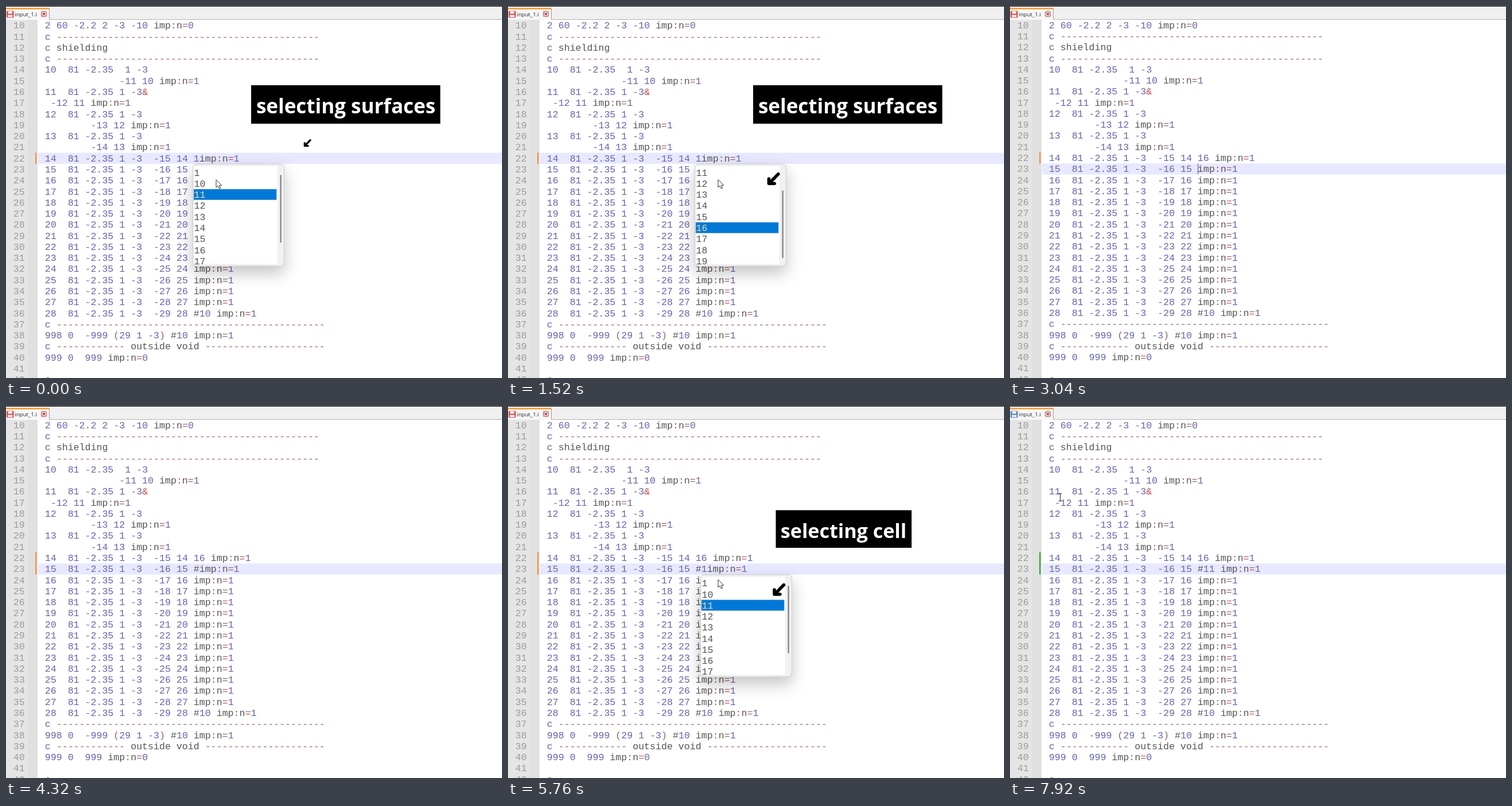
These frames come from a looping animation (864 px wide and 648 px high, 8 s). An HTML page:

```html
<!DOCTYPE html>
<html lang="en">
<head>
<meta charset="utf-8">
<title>Editor autocompletion</title>
<style>
  html, body { margin: 0; width: 100%; height: 100%; overflow: hidden; background: #fff; }
  svg { display: block; width: 100vw; height: 100vh; }
  text { white-space: pre; }
  .mono { font: 16.6px "Liberation Mono", monospace; fill: #545454; }
  .gutter { fill: #9c9c9c; }
  .num { fill: #6664ae; }
  .neg { fill: #8a6a94; }
  .op { fill: #a85a60; }
  .dash { fill: #a4686a; }
  .amp { fill: #c04848; }
  .green { fill: #2e8b60; }
  .tab { font: 9.6px "Open Sans", sans-serif; fill: #222; }
  .label text { font-family: "Open Sans", sans-serif; font-weight: 700; fill: #fff; text-anchor: middle; }
</style>
</head>
<body>
<svg viewBox="0 0 864 648">
  <defs>
    <filter id="shadow" x="-40%" y="-40%" width="180%" height="190%">
      <feDropShadow dx="0" dy="12" stdDeviation="14" flood-color="#000" flood-opacity=".23"/>
    </filter>
    <clipPath id="listClip"><rect x="-1" y="3" width="146" height="172"/></clipPath>
  </defs>
  <rect width="864" height="648" fill="#fff"/>
  <rect y="24" width="38" height="624" fill="#e5e5e5"/>
  <rect x="38" y="24" width="17" height="624" fill="#e0e0e0"/>
  <g id="doc">
    <rect id="current" x="56" width="808" height="19.3" fill="#e8e8ff"/>
    <rect id="changed" x="51" width="2.4"/>
    <g id="lines" class="mono"></g>
    <rect id="caret" width="1.4" height="18" fill="#7a5ae0"/>
    <g id="popup">
      <rect x="-2" width="159" height="178" rx="7" fill="#f1f1f1" stroke="#bbb" stroke-width=".8" filter="url(#shadow)"/>
      <rect x="-1" y="4" width="146" height="170" fill="#fff"/>
      <rect id="selected" x="-.5" width="144" height="18.5" fill="#0078d7" stroke="#5f8fae" stroke-dasharray="1"/>
      <g id="items" class="mono" clip-path="url(#listClip)"></g>
      <rect id="thumb" x="149.8" width="2.4" height="118" rx="1.2" fill="#868686"/>
    </g>
  </g>
  <rect width="864" height="24" fill="#f0f0f0"/>
  <rect width="864" height="1" fill="#111"/>
  <rect y="23" width="864" height="1" fill="#b4b4b4"/>
  <rect y="4" width="75" height="20" fill="#f7f7f7"/>
  <rect y="3" width="75" height="3" fill="#f5a64a"/>
  <path d="M75.5 4V23" stroke="#999"/>
  <g id="disk">
    <rect x="1" y="8.5" width="12.5" height="12" rx="1.5"/>
    <rect x="3.5" y="9" width="7.5" height="4.5" fill="#f4f0f0"/>
    <rect x="3" y="15.5" width="8.5" height="4" fill="#eee"/>
  </g>
  <text class="tab" x="15.5" y="18">input_1.i</text>
  <rect x="61.5" y="9.5" width="9" height="9" rx="1" fill="#f6e6e6" stroke="#a05a62"/>
  <path d="M63.5 11.5l5 5m0-5l-5 5" stroke="#b02c38" stroke-width="1.4"/>
  <path id="arrow" d="M.38-.38L-.32.34M-.37 0V.37H.08" fill="none" stroke="#000" stroke-width=".25" stroke-linecap="round" stroke-linejoin="round"/>
  <g id="label1" class="label">
    <rect x="427" y="138" width="329.5" height="67"/>
    <text x="592" y="187" font-size="35">selecting surfaces</text>
  </g>
  <g id="label2" class="label">
    <rect x="466.5" y="181.5" width="236.5" height="65.5"/>
    <text x="584.5" y="229.5" font-size="34.1">selecting cell</text>
  </g>
  <path id="pointer" d="M366 302.500v13.500l3.200-2.800 2.200 5 2.300-1-2.200-4.800h4.100z" fill="#fff" stroke="#333" stroke-width="1"/>
  <path id="beam" d="M-3-6.500H-1Q0-6.500 0-5.500Q0-6.500 1-6.500H3M0-5.500V5.500M-3 6.500H-1Q0 6.500 0 5.500Q0 6.500 1 6.500H3" fill="none" stroke="#333" stroke-width="1.100"/>
</svg>
<script>
const LOOP = 8000, PITCH = 19.28, COL = 9.962, LEFT = 67.8, FIRST = 10;
const $ = id => document.getElementById(id);
const midY = n => 33.7 + (n - FIRST) * PITCH;
const lerp = (a, b, p) => a + (b - a) * p;
const clamp = p => Math.max(0, Math.min(1, p));
const easeOut = p => 1 - (1 - p) ** 2;
const easeInOut = p => p * p * (3 - 2 * p);
const between = (t, a, b) => t >= a && t < b;
const show = (id, on) => $(id).setAttribute('display', on ? 'inline' : 'none');
const set = (id, attrs) => { for (const k in attrs) $(id).setAttribute(k, attrs[k]); };

// Last entry [time, value...] already reached at t
const at = (steps, t) => steps.filter(s => s[0] <= t).pop();

const rule = n => '-'.repeat(n);
const cell = (n, extra = '') => `${n}  81 -2.35 1 -3  -${n + 1} ${n} ${extra}imp:n=1`;
const source = [
  '2 60 -2.2 2 -3 -10 imp:n=0',
  'c ' + rule(46), 'c shielding', 'c ' + rule(46),
  '10  81 -2.35  1 -3', ' '.repeat(13) + '-11 10 imp:n=1',
  '11  81 -2.35 1 -3&', ' -12 11 imp:n=1',
  '12  81 -2.35 1 -3', ' '.repeat(8) + '-13 12 imp:n=1',
  '13  81 -2.35 1 -3', ' '.repeat(8) + '-14 13 imp:n=1'
];
for (let n = 14; n < 28; n++) source.push(cell(n));
source.push(cell(28, '#10 '), 'c ' + rule(47), '998 0  -999 (29 1 -3) #10 imp:n=1',
  `c ${rule(12)} outside void ${rule(21)}`, '999 0  999 imp:n=0', '', 'c ' + rule(46));

const span = (cls, s) => `<tspan class="${cls}">${s}</tspan>`;
function paint(s) {
  if (s[0] === 'c') return span('num', 'c') + s.slice(1).replace(/-+/g, m => span('dash', m));
  return s.replace(/-(?=\d)|[\d.]+|[:=()]|&/g, m =>
    m === '&' ? span('amp', '&amp;') : m === '-' ? span('neg', m) :
    /\d/.test(m) ? span('num', m) : span('op', m));
}

$('lines').innerHTML = source.map((s, i) => {
  const n = FIRST + i, y = midY(n) + 5.6;
  return `<text class="gutter" x="12.8" y="${y}">${n}</text>` +
    `<text id="line${n}" x="${LEFT}" y="${y}">${n === 42 ? span('green', s) : paint(s)}</text>`;
}).join('');

const ROWS = 9;
$('items').innerHTML = Array.from({ length: ROWS }, (_, i) =>
  `<text id="item${i}" x="0" y="${20.4 + i * PITCH}"></text>`).join('');

const written = {};
function write(id, html) {
  if (written[id] !== html) $(id).innerHTML = written[id] = html;
}

const typed22 = [[0, '1'], [1840, '16'], [1920, '16 ']];
const typed23 = [[0, ''], [3300, '#'], [4700, '#1'], [5880, '#11'], [5940, '#11 ']];
const carets = [[0, 22, 27], [1840, 22, 28], [1920, 22, 29], [2080, 23, 29], [2720, 23, 28],
  [2800, 23, 27], [2880, 23, 26], [3300, 23, 27], [4700, 23, 28], [5880, 23, 29], [5940, 23, 30]];
const popups = [
  { from: 0, to: 1840, line: 22, col: 26, picks: [[0, 2], [240, 3], [480, 4], [720, 5], [960, 6], [1200, 7]] },
  { from: 4700, to: 5880, line: 23, col: 27, picks: [[0, 0], [4960, 1], [5440, 2]] }
];

// Each label sends an arrow [x, y, size] from behind it to the list
const labels = [
  { id: 'label1', from: -500, to: 1880, a: [588, 176, 4], b: [462.5, 301, 22] },
  { id: 'label2', from: 4780, to: 6240, a: [591, 223, 12], b: [472, 320, 22] }
];
const FLIGHT = 1000;

function drawPopup(t) {
  const p = popups.find(q => between(t, q.from, q.to));
  show('popup', p);
  show('pointer', p);
  if (!p) return;
  const pick = at(p.picks, t)[1], top = Math.max(0, pick - 5);
  set('popup', { transform: `translate(${LEFT + p.col * COL + .8} ${midY(p.line) + 10.1})` });
  set('selected', { y: 5.4 + (pick - top) * PITCH });
  set('thumb', { y: 19 + top * 13.5 });
  for (let i = 0; i < ROWS; i++) {
    const k = top + i;
    write('item' + i, k ? 9 + k : 1);
    $('item' + i).style.fill = k === pick ? '#e0dca8' : '';
  }
}

function drawLabels(t) {
  const current = labels.find(l => between(t, l.from, l.to));
  for (const l of labels) show(l.id, l === current);
  show('arrow', current);
  if (!current) return;
  const p = easeInOut(clamp((t - current.from) / FLIGHT));
  const [x, y, s] = current.a.map((v, i) => lerp(v, current.b[i], p));
  set('arrow', { transform: `translate(${x} ${y}) scale(${s})` });
}

function render(t) {
  set('doc', { transform: `translate(0 ${t < 2960 ? 0 : -.6})` });
  write('line22', paint(cell(14, at(typed22, t)[1])));
  write('line23', paint(cell(15, at(typed23, t)[1])));

  const [since, line, col] = at(carets, t);
  set('current', { y: midY(line) - 9.5 });
  set('caret', { x: LEFT + col * COL, y: midY(line) - 9 });
  const popupOpen = popups.some(q => between(t, q.from, q.to));
  show('caret', !popupOpen && Math.floor((t - since) / 530) % 2 === 0);

  const saved = t >= 7200;
  set('changed', { y: midY(22) - 9.5, height: PITCH * (t < 3300 ? 1 : 2), fill: saved ? '#3aa33a' : '#ef9440' });
  set('disk', { fill: saved ? '#4a7fc0' : '#cf4a48' });

  drawPopup(t);
  drawLabels(t);

  const m = easeOut(clamp((t - 7280) / 480));
  show('beam', t >= 7280);
  set('beam', { transform: `translate(${lerp(366, 87.5, m)} ${lerp(303, 159, m)})` });
}

const start = performance.now();
function tick(now) {
  render(Math.max(0, now - start) % LOOP);
  requestAnimationFrame(tick);
}
render(0);
requestAnimationFrame(tick);
</script>
</body>
</html>
```
